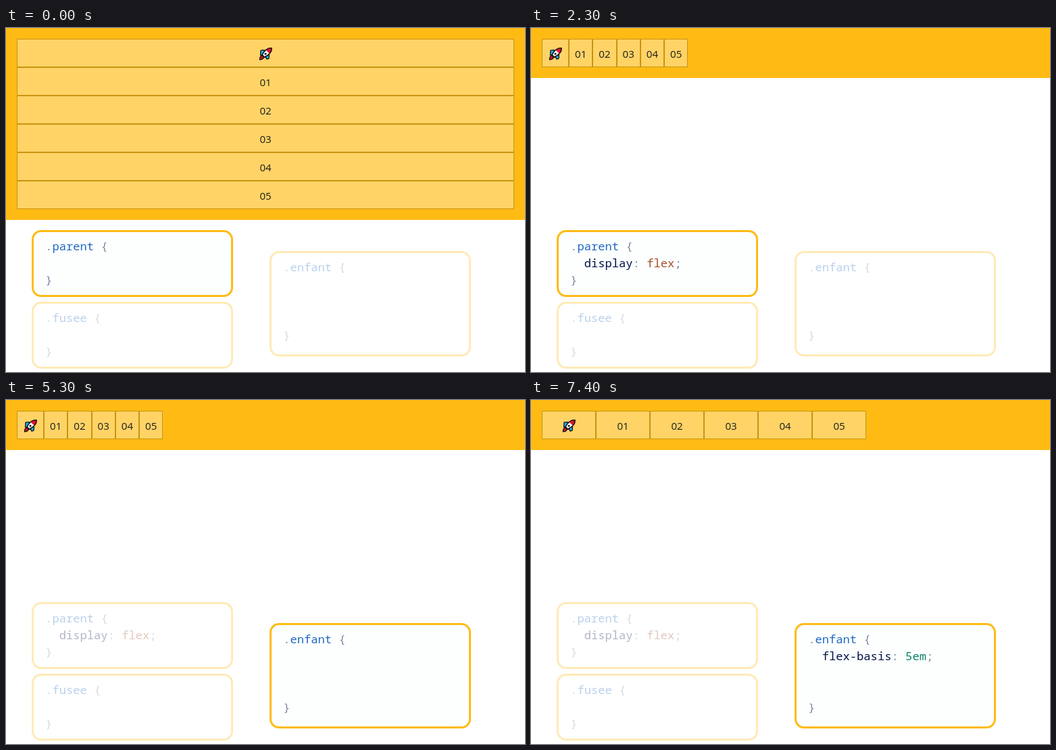
Recreate the animation shown at these times as an HTML page. Size 768 by 509 pixels, loop 8000 ms.

```html
<!DOCTYPE html>
<html lang="fr">
<head>
<meta charset="utf-8">
<title>Flexbox</title>
<style>
  html, body { margin: 0; width: 100%; height: 100%; overflow: hidden; background: #fff; }
  svg { display: block; width: 768px; height: 509px; }
  .num { font: 15.1px "Open Sans", "Noto Sans", sans-serif; text-anchor: middle; fill: #1c1c1c; }
  .code { font: 17.13px "Noto Sans Mono", "DejaVu Sans Mono", monospace; }
  .box { fill: #fcfffe; stroke: #ffbb14; stroke-width: 3; }
  .sel { fill: #1f67c6; }
  .punc { fill: #7f86a3; }
  .prop { fill: #021048; }
  .val { fill: #a54d2a; }
  .unit { fill: #098068; }
</style>
</head>
<body>
<svg viewBox="0 0 768 509">
  <defs>
    <g id="rocket" stroke="#111" stroke-width="1.3" stroke-linejoin="round">
      <path d="M-2 -5.5L-7 -5L-7.5 2L-3 2L2 7L2 8L5 7L5.5 2Z" fill="#1db4f0"/>
      <path d="M-5 2.5C-8 3.5 -8.7 6 -8.6 8.7C-6 8.6 -3.5 8 -2.5 5Z" fill="#e8112d"/>
      <path d="M9 -8.6C4 -9 -1 -6.5 -5 1.5L-1.5 5C6.500 1 9.500 -4 9 -8.6Z" fill="#f4f6f8"/>
      <path d="M9 -8.6C5.500 -8.900 3 -8 0.500 -5.800L6 -0.300C8.500 -3 9.300 -5.500 9 -8.6Z" fill="#e8112d" stroke="none"/>
      <path d="M9 -8.6C4 -9 -1 -6.5 -5 1.5L-1.500 5C6.500 1 9.500 -4 9 -8.6Z" fill="none"/>
      <circle cx="0" cy="0" r="1.500" fill="#222" stroke="none"/>
    </g>
  </defs>
  <rect id="parent" width="768" fill="#ffbb14"/>
  <g id="cells"></g>
  <g id="boxes"></g>
</svg>
<script>
const NS = "http://www.w3.org/2000/svg";
const LOOP = 8000, ADVANCE = 10.28, LINE = 25.4;
const $ = id => document.getElementById(id);

function add(parent, tag, attrs, text) {
  const el = document.createElementNS(NS, tag);
  set(el, attrs);
  if (text) el.textContent = text;
  return parent.appendChild(el);
}

function set(el, attrs) {
  for (const k in attrs) el.setAttribute(k, attrs[k]);
}

// One flex item: border, inner fill and its label
const cells = Array.from({ length: 6 }, (_, i) => {
  const g = $("cells");
  return {
    border: add(g, "rect", { fill: "#c99410" }),
    fill: add(g, "rect", { fill: "#ffd366" }),
    label: i
      ? add(g, "text", { class: "num" }, "0" + i)
      : add(g, "use", { href: "#rocket" })
  };
});

function placeCell(cell, left, top, width) {
  const x = Math.round(left), w = Math.round(left + width) - x;
  set(cell.border, { x, y: top, width: w, height: 42 });
  set(cell.fill, { x: x + 1, y: top + 1, width: w - 2, height: 40 });
  const dy = cell === cells[0] ? 22.2 : 28;
  set(cell.label, { transform: `translate(${left + width / 2} ${top + dy})` });
}

function codeBox(x, y, height, name, lines) {
  const g = add($("boxes"), "g", { class: "code" });
  add(g, "rect", { class: "box", x: x + 1.5, y: y + 1.5, width: 295, height: height - 3, rx: 12.5 });
  const put = (into, col, row, cls, text) =>
    add(into, "text", { class: cls, x: x + 20.2 + col * ADVANCE, y: y + 29.5 + row * LINE }, text);
  put(g, 0, 0, "punc", ".");
  put(g, 1, 0, "sel", name);
  put(g, name.length + 2, 0, "punc", "{");
  put(g, 0, lines + 1, "punc", "}");
  return { g, put };
}

function rule(box, prop, value, cls) {
  const g = add(box.g, "g", {});
  const end = 2 + prop.length;
  box.put(g, 2, 1, "prop", prop);
  box.put(g, end, 1, "punc", ":");
  box.put(g, end + 2, 1, cls, value);
  box.put(g, end + 2 + value.length, 1, "punc", ";");
  return g;
}

const parentBox = codeBox(38, 299, 99, "parent", 1);
const rocketBox = codeBox(38, 405, 99, "fusee", 1);
const childBox = codeBox(390, 330, 156, "enfant", 3);
const flexRule = rule(parentBox, "display", "flex", "val");
const basisRule = rule(childBox, "flex-basis", "5em", "unit");
const show = (el, on) => set(el, { visibility: on ? "visible" : "hidden" });
const focus = (box, on) => set(box.g, { opacity: on ? 1 : 0.3 });

function render(t) {
  const flex = t >= 500, child = t >= 3500, basis = t >= 6500;
  set($("parent"), { height: flex ? 74 : 284 });
  let left = 16;
  cells.forEach((cell, i) => {
    if (!flex) return placeCell(cell, 16, 16 + i * 42, 736);
    const width = basis ? 80 : i ? 35.25 : 40;
    placeCell(cell, left, 16, width);
    left += width;
  });
  show(flexRule, flex);
  show(basisRule, basis);
  focus(parentBox, !child);
  focus(rocketBox, false);
  focus(childBox, child);
}

const start = performance.now();
function tick() {
  render((performance.now() - start) % LOOP);
  requestAnimationFrame(tick);
}
tick();
</script>
</body>
</html>
```
